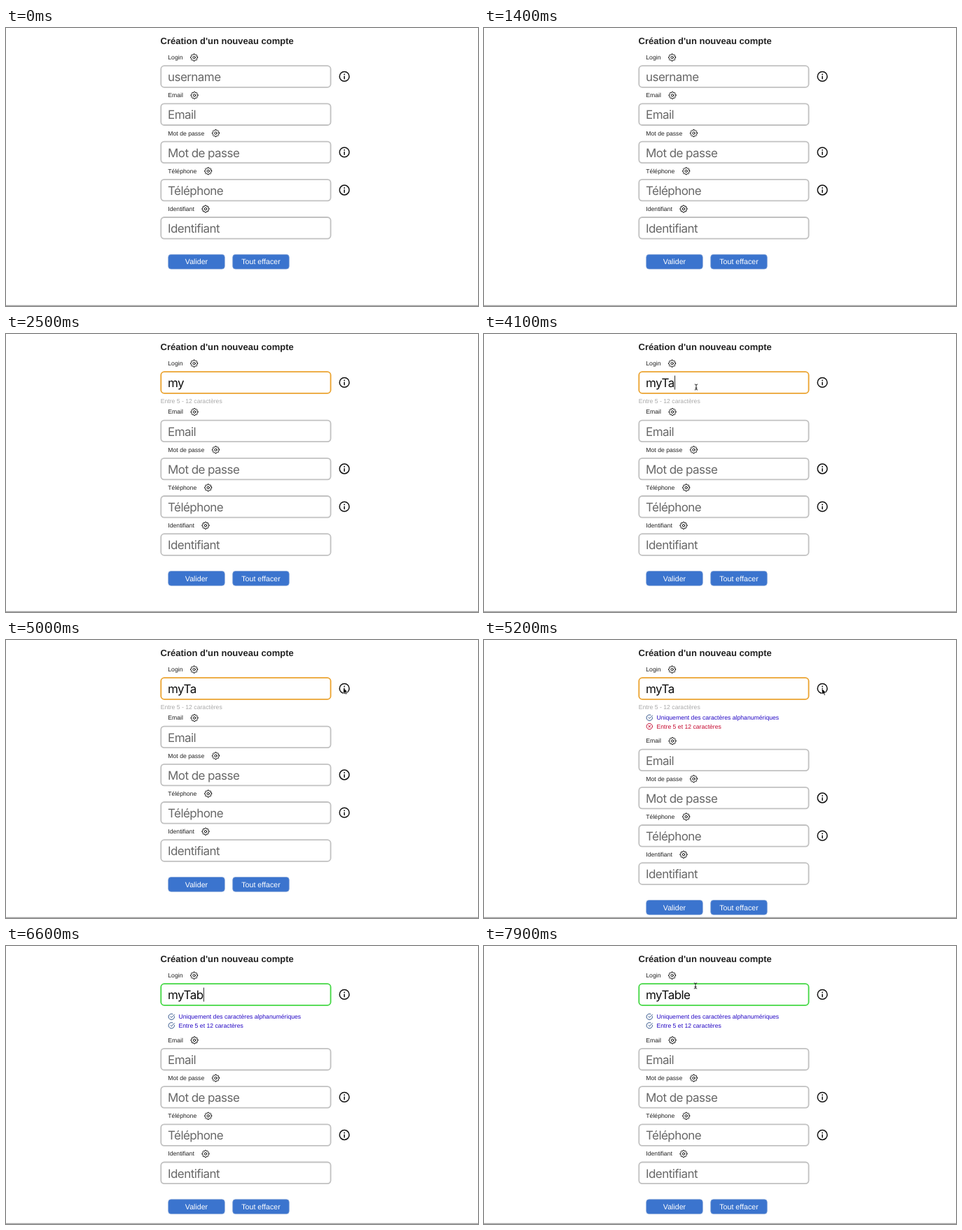
Write an HTML page that moves like this. It is 674x398 px and loops after 8 s.

```html
<!DOCTYPE html>
<html lang="fr">
<head>
<meta charset="utf-8">
<title>Création de compte</title>
<style>
  html, body { margin: 0; width: 100%; height: 100%; overflow: hidden; background: #fff; }
  svg { display: block; text-rendering: geometricPrecision; }
  text { font-family: "Liberation Sans", Arial, sans-serif; font-size: 8.66px; fill: #222; }
  .title { font-size: 13px; font-weight: bold; }
  .value { font-family: Inter, sans-serif; font-size: 17px; letter-spacing: -.033em; fill: #686868; }
  .typed { fill: #0c0c0c; }
  .help { fill: #a8a8a8; }
  .ok { fill: #2407c4; }
  .bad { fill: #c5082f; }
  .box { fill: #fff; stroke: #c1c1c1; stroke-width: 1.8; }
  .icon { fill: none; stroke: #111; stroke-linecap: round; stroke-linejoin: round; }
  .btn { fill: #3b74ce; stroke: #7f9fd4; stroke-width: .7; }
  .btn-text { font-size: 10.65px; fill: #fff; text-anchor: middle; }
</style>
</head>
<body>
<svg id="stage" width="674" height="398" viewBox="0 0 674 398"></svg>
<script>
const LOOP = 8000, STEP = 100, PITCH = 54.2, LEFT = 231;

// label, placeholder, gear x, has info icon
const rows = [
  ['Login', 'username', 268.6, true],
  ['Email', 'Email', 269.1, false],
  ['Mot de passe', 'Mot de passe', 299.5, true],
  ['Téléphone', 'Téléphone', 288.7, true],
  ['Identifiant', 'Identifiant', 285, false]
];

const text = (x, y, s, cls = '', id = '') =>
  `<text x="${x}" y="${y}" class="${cls}" id="${id}">${s}</text>`;

function gear(x, y) {
  const pts = [];
  for (let i = 0; i < 8; i++) {
    for (const [r, d] of [[5.1, -9], [5.1, 9], [4.1, 15], [4.1, 30]]) {
      const a = (i * 45 + d) * Math.PI / 180;
      pts.push((r * Math.cos(a)).toFixed(2) + ',' + (r * Math.sin(a)).toFixed(2));
    }
  }
  return `<g class="icon" transform="translate(${x} ${y})"><polygon points="${pts.join(' ')}"/><circle r="1.7"/></g>`;
}

const info = y => `<g class="icon" stroke-width="1.5" transform="translate(483.2 ${y})">
  <circle r="6.9"/><path d="M0 -.2V3.4"/><path d="M0 -3.1V-3" stroke-width="1.8"/></g>`;

const check = y => `<g class="icon" style="stroke:#2a4d86" stroke-width=".95" transform="translate(236.3 ${y})">
  <path d="M4.2 -.4V0A4.2 4.2 0 1 1 1.7 -3.8M4.2 -3L0 1.2L-1.4 -.2"/></g>`;

const cross = y => `<g class="icon" style="stroke:#c5082f" stroke-width=".95" transform="translate(236.3 ${y})">
  <circle r="4.2"/><path d="M-1.4 -1.4L1.4 1.4M1.4 -1.4L-1.4 1.4"/></g>`;

function row([label, hint, gx, hasInfo], i) {
  const y = i * PITCH;
  return text(LEFT + .3, y + 45.1, label) + gear(gx, y + 42.2) +
    `<rect class="box" ${i ? '' : 'id="login"'} x="221.3" y="${y + 54.2}" width="242.3" height="30.6" rx="4.6"/>` +
    text(LEFT, y + 76.2, hint, 'value', i ? '' : 'value') +
    (hasInfo ? info(y + 69.4) : '');
}

const button = (x, s) => `<rect class="btn" x="${x}" y="324.3" width="80.6" height="20.8" rx="4"/>` +
  text(x + 40.3, 338.4, s, 'btn-text');

const stage = document.getElementById('stage');
stage.innerHTML = `
  ${text(220.6, 22.7, "Création d'un nouveau compte", 'title')}
  ${row(rows[0], 0)}
  ${text(220.7, 98.6, 'Entre 5 - 12 caractères', 'help', 'help')}
  <g id="rules">
    ${check(111.2)}${text(246.5, 114.1, 'Uniquement des caractères alphanumériques', 'ok')}
    <g id="good">${check(123.7)}</g><g id="wrong">${cross(123.7)}</g>
    ${text(246.5, 126.6, 'Entre 5 et 12 caractères', 'ok', 'range')}
  </g>
  <g id="rest">
    ${rows.map((r, i) => i ? row(r, i) : '').join('')}
    ${button(231.7, 'Valider')}${button(323.7, 'Tout effacer')}
  </g>
  <path d="M0 397.3H674" stroke="#8c8c8c" stroke-width="1"/>
  <path id="caret" d="M0 59.6V79.6" stroke="#111" stroke-width=".9"/>
  <path id="beam" class="icon" stroke-width=".9" d="M-1.8 -4Q0 -4 0 -3V3Q0 4 -1.8 4M1.8 -4Q0 -4 0 -3M0 3Q0 4 1.8 4M-1 1.4H1"/>
  <path id="arrow" fill="#000" stroke="#fff" stroke-width=".6" d="M0 0V8.6L2 6.8L3.3 9.8L4.7 9.2L3.4 6.3H6.1Z"/>`;

const el = id => document.getElementById(id);
const show = (id, on) => el(id).setAttribute('display', on ? 'inline' : 'none');
const place = (id, x, y) => el(id).setAttribute('transform', `translate(${x} ${y})`);

const typing = [[0, ''], [1500, 'm'], [2000, 'my'], [2900, 'myT'], [3100, 'myTa'],
  [6600, 'myTab'], [6800, 'myTabl'], [7000, 'myTable']];
const carets = [[1500, 2500], [2900, 3600], [4100, 4600], [6300, 7500]];
// Form state: start, shift of the lower rows, border
const states = [[0, 0, '#c1c1c1'], [1500, 15.2, '#eba32f'], [5100, 48.2, '#eba32f'], [6600, 38.5, '#43d743']];
// Pointer moves: time, x, y; hidden between moves
const moves = [
  [[4100, 303, 76], [4300, 328, 63], [4500, 385, 40], [4600, 418, 38], [4800, 470, 56],
   [4900, 481, 67], [5100, 482.6, 69.5], [5400, 482.6, 69.5], [5700, 462, 72], [5900, 452, 74], [6600, 452, 74]],
  [[7300, 452, 74], [7500, 380, 69], [7700, 281, 62], [7900, 302, 57], [8000, 302, 57]]
];

const last = (list, t) => list.filter(k => k[0] <= t).pop();

function pointer(t) {
  const path = moves.find(m => t >= m[0][0] && t < m[m.length - 1][0]);
  if (!path) return null;
  const i = path.findIndex(k => k[0] > t);
  const [t0, x0, y0] = path[i - 1], [t1, x1, y1] = path[i];
  const p = (t - t0) / (t1 - t0);
  return [x0 + (x1 - x0) * p, y0 + (y1 - y0) * p];
}

function draw(t) {
  const typed = last(typing, t)[1];
  const [start, shift, border] = last(states, t);
  const valid = typed.length >= 5;

  const value = el('value');
  value.textContent = typed || rows[0][1];
  value.setAttribute('class', typed ? 'value typed' : 'value');
  el('login').style.stroke = border;
  place('rest', 0, shift);

  show('help', typed && !valid);
  show('rules', start >= 5100);
  place('rules', 0, valid ? -10 : 0);
  show('good', valid);
  show('wrong', !valid);
  el('range').setAttribute('class', valid ? 'ok' : 'bad');

  show('caret', carets.some(([a, b]) => t >= a && t < b));
  place('caret', LEFT + value.getComputedTextLength() + .9, 0);

  const pos = pointer(t);
  const inside = pos && pos[0] < 464 && pos[1] > 53 && pos[1] < 86;
  show('beam', inside);
  show('arrow', pos && !inside);
  if (pos) place(inside ? 'beam' : 'arrow', ...pos);
}

const begin = performance.now();
let shown = -1;
function tick() {
  const t = Math.floor(((performance.now() - begin) % LOOP) / STEP) * STEP;
  if (t !== shown) draw(shown = t);
  requestAnimationFrame(tick);
}
draw(0);
tick();
</script>
</body>
</html>
```
